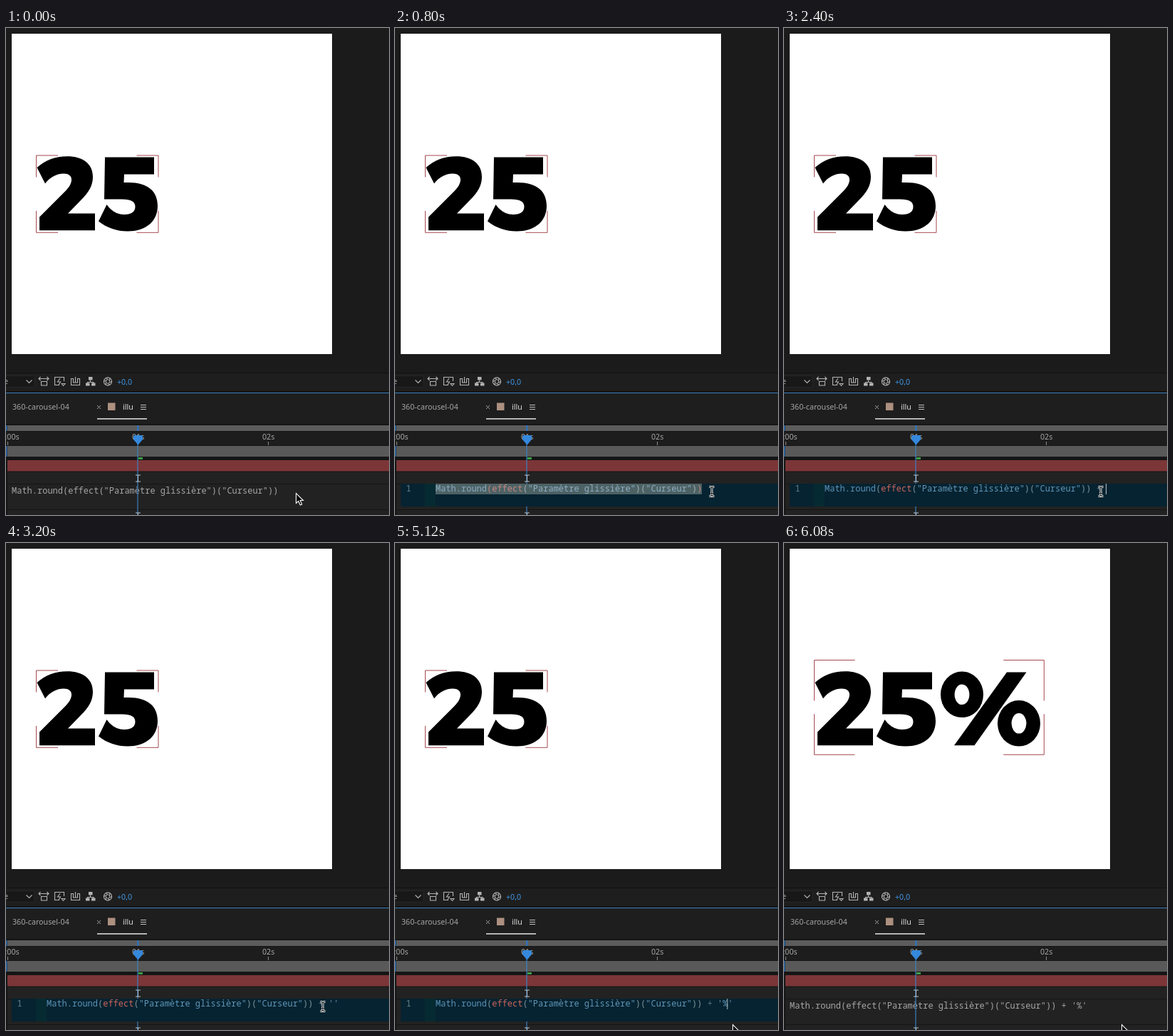
Write an HTML page that moves like this. It is 538 by 684 pixels and loops after 6160 ms.

```html
<!DOCTYPE html>
<html lang="fr">
<head>
<meta charset="utf-8">
<title>Expression editing</title>
<style>
  html, body { margin: 0; width: 100%; height: 100%; overflow: hidden; background: #1b1b1b; }
  svg { display: block; width: 538px; height: 684px; }
  text { white-space: pre; }
  .ui { font: 10.7px "Noto Sans", "Open Sans", sans-serif; fill: #a6a6a6; }
  .code { font: 12px "Noto Sans Mono", "DejaVu Sans Mono", monospace; }
  .icon { fill: none; stroke: #b4b4b4; stroke-width: 1.1; }
</style>
</head>
<body>
<svg viewBox="0 0 538 684" xmlns="http://www.w3.org/2000/svg">
  <defs>
    <path id="beam" d="M-3.5 -6.5 H-1.5 L0 -5.5 L1.5 -6.5 H3.5 M0 -5.5 V5.5 M-3.5 6.5 H-1.5 L0 5.5 L1.5 6.5 H3.5 M-2 2.5 H2" fill="none"/>
    <path id="marker" d="M-3.5 -4.5 H3.5 M0 -4.5 V4.5 M-3.5 4.5 H3.5" fill="none" stroke="#b9c4cf"/>
  </defs>

  <!-- viewer -->
  <rect width="538" height="684" fill="#1b1b1b"/>
  <rect x="8" y="8" width="450" height="450" fill="#fff"/>
  <g id="digits" role="img" aria-label="25">
    <path d="M43.5 196 C55 186 69 180.300 86 180.300 C108 180.300 122 191 122 209 C122 221 117 230 105 242 L87 260.500 H125 V284.300 H47 V265.500 L83 229.500 C89 223.500 92 218 92 213 C92 207.500 88 204.500 81 204.500 C72 204.500 62 209 55 218.500 Z"/>
    <path d="M139 181.500 H208 V205.500 H166 L165.500 217 H172 C199 217 213 229 213 250 C213 271 197 285.500 171 285.500 C156 285.500 142 281 130 271.500 L141.500 248 C148 257 156 262 166 262 C176 262 181.500 258 181.500 251 C181.500 244 176 240.500 163 240.500 H138 Z"/>
  </g>
  <g id="percent">
    <path d="M313 181.500 H340.500 L267.500 284.300 H239 Z"/>
    <ellipse cx="250" cy="212.800" rx="30" ry="32.300"/>
    <ellipse cx="330" cy="253.300" rx="30" ry="32.300"/>
    <g fill="#fff">
      <ellipse cx="250" cy="212.800" rx="10.400" ry="14.300"/>
      <ellipse cx="330" cy="253.300" rx="10.400" ry="14.300"/>
    </g>
  </g>
  <path id="frame" fill="none" stroke="#a5484f"/>

  <!-- viewer toolbar -->
  <path d="M0 484.500 H538" stroke="#111"/>
  <rect y="485" width="538" height="25" fill="#1e1e1e"/>
  <rect x="-4" y="488.500" width="44" height="16" rx="2" fill="#181818" stroke="#262626"/>
  <text class="ui" x="-3" y="500">e</text>
  <g class="icon">
    <path d="M28.500 494.500 L32.500 498.500 L36.500 494.500"/>
    <path d="M46 492.500 H60 M48.500 490 L46 492.500 L48.500 495 M57.500 490 L60 492.500 L57.500 495 M49.500 496.500 H57.500 V502 H49.500 Z"/>
    <path d="M81.500 496 V490.500 H68.500 V501.500 H75 M76 492 L72.500 497 H76.500 L74 501 M78 499.500 H83 L80.500 502.500 Z"/>
    <path d="M91.500 492.500 V501.500 H103.500 V492.500 H100.500 V498 H94.500 V492.500 Z M97.500 490 V498"/>
    <path d="M118.500 494.500 V497.500 M114.500 499 V497.500 H123 V499"/>
    <circle cx="143" cy="496.500" r="5.600"/>
    <path id="blades"/>
  </g>
  <path d="M116 490 h5.500 v4.500 h-5.500 Z M112 498.500 h5.500 v4 h-5.500 Z M120 498.500 h5.500 v4 h-5.500 Z" fill="#b4b4b4"/>
  <text class="ui" x="156" y="500.500" style="fill:#3f96e6">+0,0</text>

  <!-- timeline tabs -->
  <rect y="510" width="538" height="2" fill="#141414"/>
  <rect y="512" width="538" height="1.300" fill="#3c7cba"/>
  <rect y="513.300" width="538" height="43" fill="#1e1e1e"/>
  <text class="ui" x="9" y="536">360-carousel-04</text>
  <path d="M128 530 l5 5 m0 -5 l-5 5" stroke="#a0a0a0"/>
  <rect x="143" y="526.500" width="10.500" height="10.500" fill="#ad9080"/>
  <text class="ui" x="164" y="536" style="fill:#dcdcdc;font-weight:500">illu</text>
  <path d="M189 529.500 h8 m-8 3 h8 m-8 3 h8" stroke="#c4c4c4"/>
  <rect x="128" y="548" width="70" height="1.800" fill="#c4c4c4"/>

  <!-- ruler and layer -->
  <rect y="556" width="538" height="128" fill="#151515"/>
  <rect x="2" y="558" width="536" height="8" fill="#5c5c5c"/>
  <rect y="567" width="538" height="19" fill="#1d1d1d"/>
  <rect x="2" y="587" width="536" height="15" fill="#595959"/>
  <path d="M0 558 h1.500 v8 h-1.500 Z M0 587 h1.500 v15 h-1.500 Z M184 558 h2.500 v8 h-2.500 Z" fill="#3172b4"/>
  <path d="M2.500 581 V586 M368.500 581 V586" stroke="#8a8a8a"/>
  <g class="ui">
    <text x="-1.500" y="578">:00s</text>
    <text x="177" y="578">01s</text>
    <text x="360" y="578">02s</text>
  </g>
  <rect x="186" y="603" width="6" height="2.800" fill="#3da648"/>
  <rect x="2" y="607" width="536" height="15.500" fill="#7c3638"/>
  <rect x="2" y="623.500" width="536" height="16.500" fill="#222"/>
  <rect x="2" y="641" width="536" height="35" fill="#222"/>
  <rect x="2" y="677" width="536" height="7" fill="#222"/>
  <text id="plain" class="code" x="8" y="654" fill="#a6a6a6" font-weight="500" style="font-weight:500"></text>
  <path d="M185 584 V684" stroke="#3b82c4" stroke-width="1.200"/>
  <path d="M180 572 H191 L192 573.500 V578 L185.500 585.500 L179 578 V573.500 Z" fill="#3588db"/>
  <use href="#marker" x="185.500" y="632.500"/>
  <use href="#marker" x="185.500" y="685.500"/>

  <!-- expression editor -->
  <g id="editor" class="code">
    <rect x="8" y="640" width="530" height="32" fill="#062331"/>
    <rect x="42" y="640" width="15" height="32" fill="#062a31"/>
    <text x="15.500" y="651" fill="#647f89">1</text>
    <rect id="selection" x="57" y="640" width="374" height="15" fill="#4d6265"/>
    <text id="source" x="57" y="651"></text>
    <path id="caret" d="M0 640 V655" stroke="#b4c2c6"/>
  </g>

  <g id="pointer">
    <path id="arrow" d="M.5 .5 V14.500 L3.700 11.500 L6.300 17 L8.700 16 L6.200 10.500 H10.500 Z" fill="#000" stroke="#fff" stroke-width="1.100"/>
    <g id="ibeam">
      <use href="#beam" stroke="#f2f2f2" stroke-width="3"/>
      <use href="#beam" stroke="#0b1215" stroke-width="1.100"/>
    </g>
  </g>
</svg>
<script>
const LOOP = 6160, STEP = 80, BLINK = 400;
const OPEN = 320, DESELECT = 960, APPLY = 5200;
const CHAR = 7.2, CODE_X = 57;
const BASE = 'Math.round(effect("Paramètre glissière")("Curseur"))';

// [time, text after the base expression, caret column after it]
const EDITS = [
  [DESELECT, '', 0], [1760, ' ', 1], [1920, ' +', 2], [2160, ' + ', 3],
  [2720, " + ''", 4], [3520, " + '%'", 5]
];
// [start, end, x, y] of each pointer move
const MOVES = [[400, 640, 445, 651], [3680, 4000, 442, 664], [4160, 4560, 474, 676]];
const COLORS = { name: '#5a93b8', key: '#d0655a', str: '#6096b8', dim: '#56727c', paren: '#7c949b' };

const el = Object.fromEntries([...document.querySelectorAll('[id]')].map(n => [n.id, n]));
const show = (node, on) => node.setAttribute('visibility', on ? 'inherit' : 'hidden');

el.blades.setAttribute('d', [0, 1, 2, 3, 4, 5].map(i => {
  const at = (r, a) => `${143 + r * Math.cos(a)} ${496.5 + r * Math.sin(a)}`;
  const a = i * Math.PI / 3;
  return `M${at(5.6, a)} L${at(2.4, a + 1.2)}`;
}).join(' '));

function corners(l, t, r, b, len) {
  const corner = (x, y, dx, dy) => `M${x + dx * len} ${y} H${x} V${y + dy * len}`;
  return [corner(l, t, 1, 1), corner(r, t, -1, 1), corner(l, b, 1, -1), corner(r, b, -1, -1)].join(' ');
}

function pointerAt(t) {
  let x = 407, y = 653;
  for (const [start, end, tx, ty] of MOVES) {
    const p = Math.min(1, Math.max(0, (t - start) / (end - start)));
    const k = p * p * (3 - 2 * p);
    x += (tx - x) * k;
    y += (ty - y) * k;
  }
  return [x, y];
}

function highlight(code, matched) {
  const last = BASE.length - 1;
  return code.replace(/"[^"]*"|'[^']*'|effect|[\w.]+|[()]|\S/g, (word, at) => {
    let color = COLORS.dim;
    if (word === 'effect') color = COLORS.key;
    else if (/^["']/.test(word)) color = COLORS.str;
    else if (/^\w/.test(word)) color = COLORS.name;
    else if (/[()]/.test(word)) color = matched && (at === 10 || at === last) ? COLORS.key : COLORS.paren;
    return `<tspan fill="${color}">${word}</tspan>`;
  });
}

let lastMarkup = '';
function setSource(markup) {
  if (markup !== lastMarkup) el.source.innerHTML = lastMarkup = markup;
}

function draw(time) {
  const t = Math.floor((time % LOOP) / STEP) * STEP;
  const open = t >= OPEN && t < APPLY;
  const done = t >= APPLY;
  const selected = t < DESELECT;
  const edit = EDITS.filter(e => e[0] <= t).pop() || [0, '', 0];
  const [since, tail, column] = edit;

  show(el.percent, done);
  el.digits.setAttribute('aria-label', done ? '25%' : '25');
  el.frame.setAttribute('d', done ? corners(42.5, 164.5, 365.3, 297.3, 57) : corners(42.5, 179, 214, 287.3, 30.5));

  el.plain.textContent = BASE + (done ? tail : '');
  show(el.plain, !open);
  show(el.editor, open);
  show(el.selection, selected);
  setSource(highlight(BASE + tail, tail === ''));
  el.source.setAttribute('style', selected ? 'filter:brightness(1.2) saturate(.5)' : '');
  show(el.caret, !selected && (t - since) % (2 * BLINK) < BLINK);
  el.caret.setAttribute('transform', `translate(${CODE_X + (BASE.length + column) * CHAR - .5})`);

  const [x, y] = pointerAt(t);
  const typing = open && y < 671;
  el.pointer.setAttribute('transform', `translate(${x} ${y})`);
  show(el.ibeam, typing);
  show(el.arrow, !typing);
}

const start = performance.now();
function tick(now) {
  draw(Math.max(0, now - start));
  requestAnimationFrame(tick);
}
draw(0);
requestAnimationFrame(tick);
</script>
</body>
</html>
```
